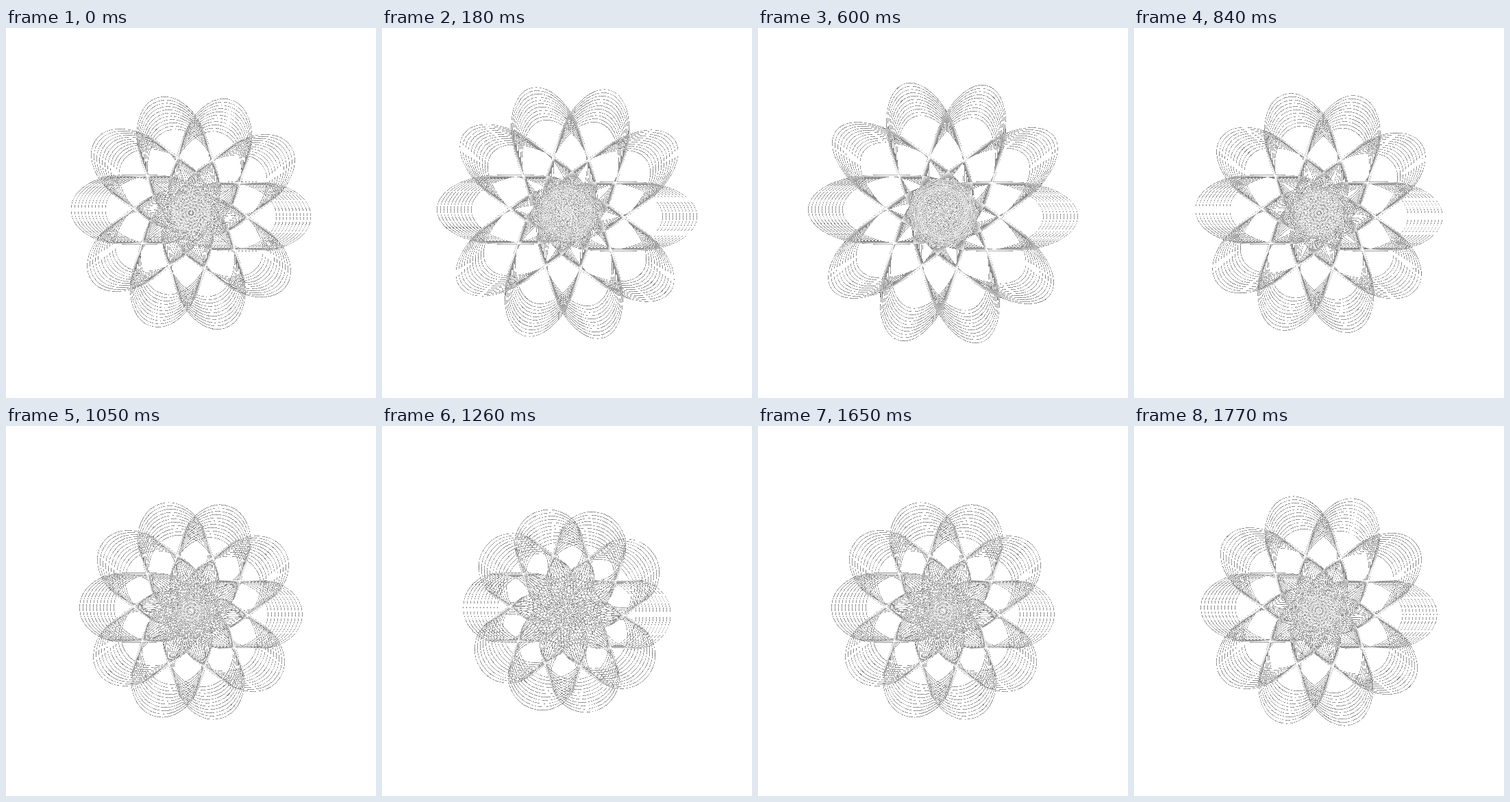
An HTML page with a canvas that plays this animation: 540 by 540 pixels, repeating every 1800 ms.

```html
<!DOCTYPE html>
<html lang="en">
<head>
<meta charset="utf-8">
<title>Breathing rosette</title>
<style>
  html, body { margin: 0; width: 100%; height: 100%; overflow: hidden; background: #fff; }
  canvas { display: block; width: 540px; height: 540px; }
</style>
</head>
<body>
<canvas id="stage" width="540" height="540"></canvas>
<script>
const SIZE = 540;
const LOOP = 1800;
const STEP = 30;
const PETALS = 10;
const RINGS = 11;
const CUTOFF = 115;
const ctx = document.getElementById('stage')
  .getContext('2d', { alpha: false, willReadFrequently: true });

function drawRosette(radiusX) {
  ctx.setTransform(1, 0, 0, 1, 0, 0);
  ctx.fillStyle = '#000';
  ctx.fillRect(0, 0, SIZE, SIZE);
  ctx.strokeStyle = 'rgba(255, 255, 255, 0.65)';
  ctx.lineWidth = 1;
  ctx.translate(SIZE / 2, SIZE / 2);
  for (let petal = 0; petal < PETALS; petal++) {
    for (let ring = 0; ring < RINGS; ring++) {
      ctx.beginPath();
      ctx.ellipse(100 - 5 * ring, 5, radiusX, 50, 0, 0, 2 * Math.PI);
      ctx.stroke();
    }
    ctx.rotate(2 * Math.PI / PETALS);
  }
}

// Faint pixels drop out to white: thin lines turn into grey dashes, dense bands stay light.
function clearFaintPixels() {
  const image = ctx.getImageData(0, 0, SIZE, SIZE);
  const pixels = new Uint32Array(image.data.buffer);
  for (let i = 0; i < pixels.length; i++) {
    if ((pixels[i] & 255) < CUTOFF) pixels[i] = 0xffffffff;
  }
  ctx.putImageData(image, 0, 0);
}

function draw(time) {
  drawRosette(75 + 25 * Math.sin(2 * Math.PI * time / LOOP));
  clearFaintPixels();
}

let start, shown;
function tick(now) {
  if (start === undefined) start = now;
  const time = Math.floor(Math.max(0, now - start) % LOOP / STEP) * STEP;
  if (time !== shown) draw(shown = time);
  requestAnimationFrame(tick);
}

draw(0);
requestAnimationFrame(tick);
</script>
</body>
</html>
```
